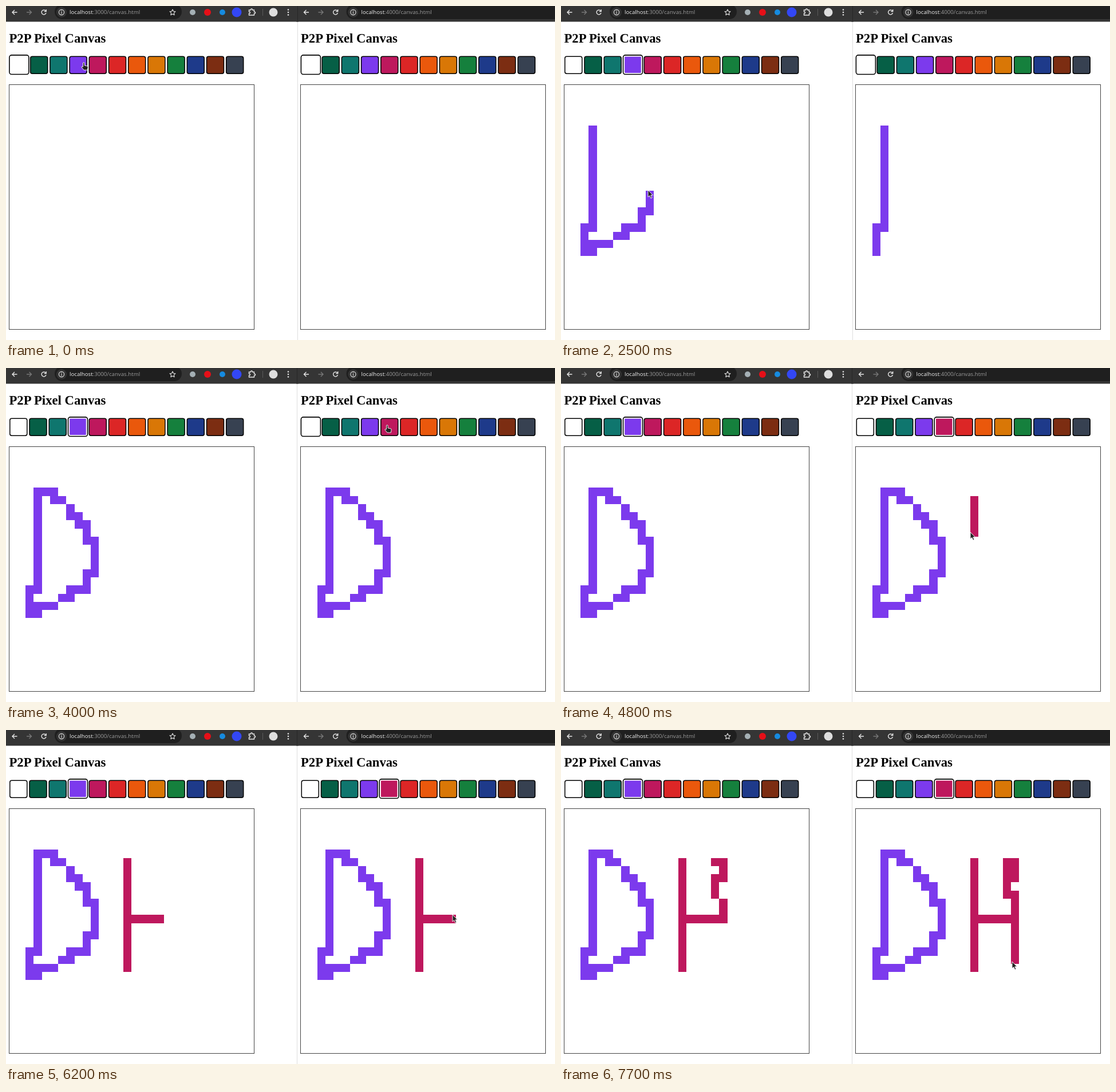
Recreate the animation shown at these times as an HTML page. Size 959 px wide and 584 px high, loop 8000 ms.

```html
<!DOCTYPE html>
<html lang="en">
<head>
<meta charset="utf-8">
<title>P2P Pixel Canvas</title>
<style>
  html, body { margin: 0; height: 100%; overflow: hidden; background: #fff; }
  svg { display: block; }
  .title { font: bold 22.7px "Liberation Serif", serif; }
  .url { font: 9.7px "Open Sans", sans-serif; fill: #9a9a9a; }
  .url .host { fill: #eee; }
  .icon { fill: none; stroke: #e6e6e6; stroke-width: 1.4; }
  .dim { stroke: #777; }
  .cells { shape-rendering: crispEdges; }
</style>
</head>
<body>
<svg id="stage" width="959" height="584" viewBox="0 0 959 584"></svg>
<script>
const LOOP = 8000, STEP = 100;
const OFFSETS = [0, 509.5];
const CELL = 14.25, GRID_X = 5.5, GRID_Y = 138;
const COLORS = ['#fff', '#065f46', '#0f766e', '#7c3aed', '#be185d', '#dc2626',
  '#ea580c', '#d97706', '#15803d', '#1e3a8a', '#7c2d12', '#374151'];

// Pen strokes: start cell, then runs of steps (e, q, s are diagonals).
const STROKES = [
  { panel: 0, color: 3, start: [3, 5], syncs: [1500, 2700, 3900],
    path: 'd12 l d3 r u r2 e r u r2 u2 r u4 l u2 l u l u q l u l' },
  { panel: 1, color: 4, start: [14, 6], syncs: [5100, 6100, 7000],
    path: 'd13 u6 r5 u2 q u2 r u2 l d3 s d8' }
];
const DIRS = { u: [0, -1], d: [0, 1], l: [-1, 0], r: [1, 0], e: [1, -1], q: [-1, -1], s: [1, 1] };

// Pointer: time in 100 ms, x, y, cells painted so far.
const POINTER = [
  [5, 136, 99, 0], [8, 55, 213, 1], [11, 55, 284, 6], [13, 45, 386, 14],
  [14, 45, 430, 17], [18, 50, 428, 18], [20, 41, 421, 18], [21, 52, 418, 19],
  [22, 76, 415, 21], [23, 100, 402, 23], [24, 138, 382, 27], [25, 152, 322, 31],
  [27, 126, 270, 37], [29, 86, 222, 42], [31, 71, 212, 44], [32, 71, 212, 44],
  [40, 666, 100, 44], [43, 666, 100, 44], [46, 721, 228, 45], [47, 720, 240, 46],
  [48, 715, 287, 49], [50, 718, 382, 56], [52, 719, 414, 58], [57, 722, 331, 64],
  [59, 752, 330, 66], [61, 774, 325, 68], [62, 780, 323, 68], [65, 787, 302, 71],
  [67, 779, 262, 74], [68, 787, 246, 76], [70, 781, 228, 78], [71, 779, 240, 79],
  [74, 787, 285, 82], [77, 788, 405, 90]
];

function pointerAt(time) {
  const t = time / 100;
  const next = POINTER.findIndex(key => key[0] > t);
  if (next < 0) return POINTER.at(-1).slice(1);
  if (next === 0) return POINTER[0].slice(1);
  const a = POINTER[next - 1], b = POINTER[next];
  const k = (t - a[0]) / (b[0] - a[0]);
  return [1, 2, 3].map(i => a[i] + (b[i] - a[i]) * k);
}

const paintedAt = time => Math.floor(pointerAt(time)[2] + 1e-6);

function traceCells({ start, path }) {
  let [col, row] = start;
  const cells = [[col, row]];
  for (const [, dir, count] of path.matchAll(/([a-z])(\d*)/g)) {
    for (let i = 0; i < (+count || 1); i++) {
      col += DIRS[dir][0];
      row += DIRS[dir][1];
      cells.push([col, row]);
    }
  }
  return cells;
}

function cellRect([col, row], offset, color) {
  const x = c => Math.round(offset + GRID_X + CELL * c);
  const y = r => Math.round(GRID_Y + CELL * r);
  return `<rect x="${x(col)}" y="${y(row)}" width="${x(col + 1) - x(col)}"
    height="${y(row + 1) - y(row)}" fill="${color}" visibility="hidden"/>`;
}

function palette(selected) {
  return COLORS.map((color, i) => {
    const x = 34.2 * i;
    if (i === selected) {
      return `<rect x="${x + 5.9}" y="85.9" width="34" height="33.6" rx="4" fill="#fff" stroke="#000" stroke-width="1.6"/>
        <rect x="${x + 8.6}" y="88.5" width="28.6" height="28.5" rx="1" fill="${color}"/>`;
    }
    const left = x + (i < selected ? 6.8 : 8.5);
    return `<rect x="${left}" y="88.3" width="30" height="30" rx="3.2" fill="${color}" stroke="#000" stroke-width="1.5"/>`;
  }).join('');
}

const dot = (x, y, r, color) => `<circle cx="${x}" cy="${y}" r="${r}" fill="${color}"/>`;

function panel(index, port, pillWidth) {
  return `<g transform="translate(${OFFSETS[index]})">
    <rect x="85" y="-3" width="${pillWidth}" height="26" rx="13" fill="#1f1f1f"/>
    ${dot(97, 11, 9, '#343434')}
    <g class="icon">
      <path d="M19.5 11H11M15 7l-4 4 4 4"/>
      <path class="dim" d="M36 11h8.5M40.500 7l4 4-4 4"/>
      <path d="M69.300 8.500A4 4 0 1 0 70 12M70.200 6v3.600h-3.600"/>
      <circle cx="97" cy="11" r="4.600" stroke-width="1.100"/>
      <path d="M97 10.400v3M97 8.200v1.200" stroke-width="1.200"/>
    </g>
    <text class="url" x="111" y="14.3"><tspan class="host">localhost</tspan>:${port}/canvas.html</text>
    <text class="title" x="5.500" y="63.5">P2P Pixel Canvas</text>
    <g id="palette${index}"></g>
  </g>
  <rect x="${Math.floor(OFFSETS[index]) + 5.5}" y="137.5" width="428" height="428" fill="none" stroke="#444"/>`;
}

const toolbar = `
  <path class="icon" stroke-linejoin="round" style="stroke-width:1.1"
    d="M291 6l1.500 3.300 3.500.4-2.600 2.400.7 3.600-3.100-1.800-3.100 1.800.7-3.600-2.600-2.400 3.500-.4z"/>
  ${dot(326, 11, 5, '#a5b0b5')}${dot(352, 11, 6, '#e60f18')}
  ${dot(378, 11, 5, '#168be0')}${dot(403, 11, 8.500, '#3347f5')}
  <path class="icon" d="M424.500 7h3V6.500a1.500 1.500 0 0 1 3 0V7h3v3.200h.6a1.500 1.500 0 0 1 0 3h-.6V16h-9v-3h.5a1.500 1.500 0 0 0 0-3h-.5z"/>
  <path d="M448.500 5v12" stroke="#5a5a5a"/>
  ${dot(467, 11, 7.500, '#dedede')}
  ${[6.500, 11, 15.500].map(y => dot(493, y, 1.300, '#e6e6e6')).join('')}`;

const strokeCells = STROKES.flatMap(stroke =>
  traceCells(stroke).map(cell => ({ cell, stroke })));

const stage = document.getElementById('stage');
stage.innerHTML = `
  <rect width="959" height="584" fill="#fff"/>
  <rect width="959" height="27.5" fill="#353535"/>
  <rect id="divider" y="0" width="1" height="584" fill="#ddd"/>
  <rect x="507" width="4" height="27.5" fill="#353535"/>
  <path id="barEdge" d="M.5 0v27.5" stroke="#272727"/>
  ${panel(0, 3000, 222)}${panel(1, 4000, 400)}${toolbar}
  ${OFFSETS.map((offset, i) => `<g id="cells${i}" class="cells">${strokeCells.map(
    ({ cell, stroke }) => cellRect(cell, offset, COLORS[stroke.color])).join('')}</g>`).join('')}
  <g id="pointer" fill="#222" stroke="#fff" stroke-width=".9" stroke-linejoin="round">
    <path id="arrow" d="M0 0v12l2.800-2.400 2.100 4.600 2.100-1-2.100-4.400h3.700z"/>
    <path id="hand" d="M-1.500 1a1.300 1.300 0 0 1 2.600 0v4l4.800 1q1.500.5 1.300 2l-.9 5h-6.200l-4.200-5q0-2 2.600-.7z"/>
  </g>`;

const byId = id => document.getElementById(id);
const show = (el, visible) => el.setAttribute('visibility', visible ? 'visible' : 'hidden');
const cellNodes = OFFSETS.map((_, i) => [...byId('cells' + i).children]);
const selections = [];

function select(index, color) {
  if (selections[index] === color) return;
  selections[index] = color;
  byId('palette' + index).innerHTML = palette(color);
}

function render(time) {
  const [x, y] = pointerAt(time);
  byId('pointer').setAttribute('transform', `translate(${x} ${y})`);
  show(byId('hand'), y < 119);
  show(byId('arrow'), y >= 119);

  select(0, time < 400 ? 0 : 3);
  select(1, time < 4300 ? 0 : 4);

  const dividerX = time < 3800 ? 509 : 508;
  byId('divider').setAttribute('x', dividerX);
  byId('barEdge').setAttribute('transform', `translate(${dividerX})`);

  // The drawing side is live; the other side receives batches.
  const live = paintedAt(time);
  const synced = new Map(STROKES.map(stroke => {
    const last = stroke.syncs.filter(sync => sync <= time).at(-1);
    return [stroke, last ? paintedAt(last) : 0];
  }));
  cellNodes.forEach((nodes, side) => nodes.forEach((node, i) => {
    const { stroke } = strokeCells[i];
    show(node, i < (stroke.panel === side ? live : synced.get(stroke)));
  }));
}

function tick() {
  const time = performance.now() % LOOP;
  render(Math.floor(time / STEP) * STEP);
  requestAnimationFrame(tick);
}
tick();
</script>
</body>
</html>
```
